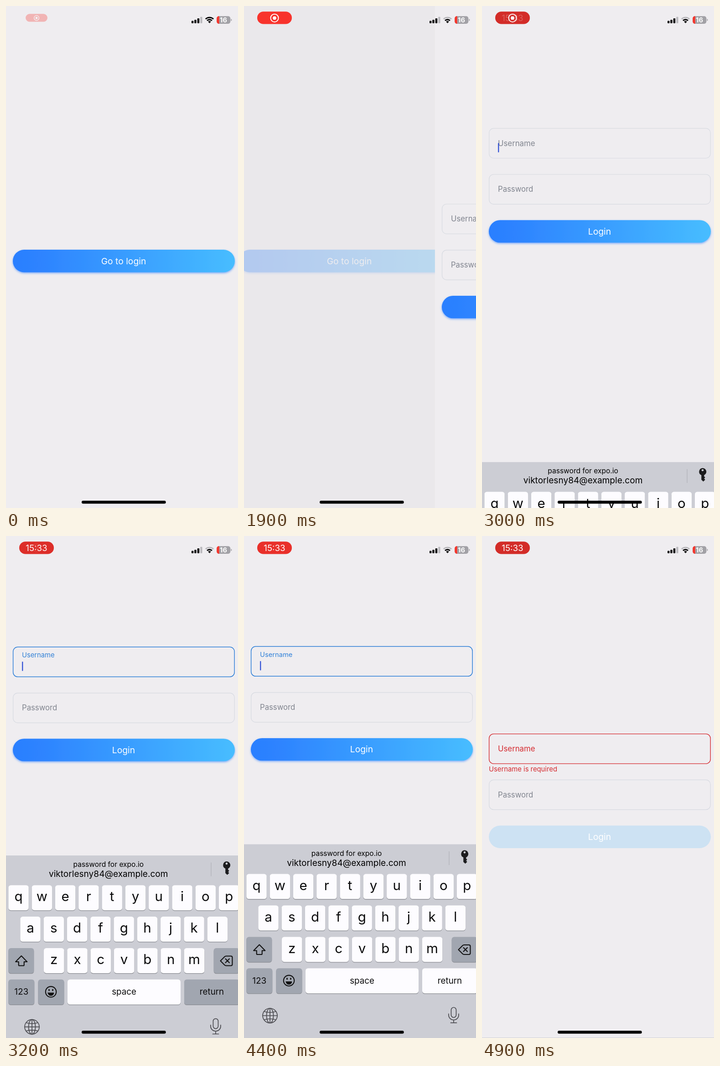
An HTML page that plays this animation: 509x1100 px, repeating every 5000 ms.

```html
<!DOCTYPE html>
<html lang="en">
<head>
<meta charset="utf-8">
<title>Login form</title>
<style>
  html, body { margin: 0; width: 100%; height: 100%; overflow: hidden; background: #efedf0; }
  svg { display: block; width: 100vw; height: 100vh; }
  text { font-family: Inter, Roboto, sans-serif; }
  .mid { text-anchor: middle; }
</style>
</head>
<body>
<svg viewBox="0 0 509 1100">
  <defs>
    <linearGradient id="blue">
      <stop offset="0" stop-color="#2b7fff"/>
      <stop offset=".12" stop-color="#2d83ff"/>
      <stop offset="1" stop-color="#47bdff"/>
    </linearGradient>
    <filter id="glow" x="-5%" y="-20%" width="110%" height="150%">
      <feDropShadow dx="0" dy="2" stdDeviation="1.9" flood-color="#2b7fff" flood-opacity=".6"/>
    </filter>
  </defs>

  <g id="home">
    <rect width="509" height="1100" fill="#efedf0"/>
    <g id="go">
      <rect x="15" y="534" width="487" height="49.5" rx="24.7" fill="url(#blue)" filter="url(#glow)"/>
      <text class="mid" x="258" y="565.5" font-size="19.3" fill="#fff">Go to login</text>
    </g>
  </g>
  <rect id="dim" width="509" height="1100"/>

  <g id="login">
    <rect width="509" height="1100" fill="#efedf0"/>
    <g id="form">
      <rect id="userBox" x="15.6" y="434" width="485.6" height="65.3" rx="10" fill="none"/>
      <text id="userLabel" x="35">Username</text>
      <rect id="caret" x="35" y="466" width="2.4" height="20.5" rx="1" fill="#3b58d6"/>
      <text id="error" x="15" y="516.5" font-size="14.8" fill="#d52b30">Username is required</text>
      <rect x="15.6" y="534.8" width="485.6" height="65.3" rx="10" fill="none" stroke="#d7dae1" stroke-width="1.2"/>
      <text x="35" y="573" font-size="16.7" fill="#81858f">Password</text>
      <rect id="submit" x="15" y="635" width="487" height="49.3" rx="24.6"/>
      <text class="mid" x="258" y="666.3" font-size="19.3" fill="#fff">Login</text>
    </g>
  </g>

  <g id="board">
    <rect y="675.5" width="509" height="430" fill="#cccdd4"/>
    <g id="hint" class="mid">
      <text x="225" y="700.5" font-size="15.55">password for expo.io</text>
      <text x="225" y="722.5" font-size="19.1">viktorlesny84@example.com</text>
    </g>
    <path d="M450 691V721" stroke="#b2b3ba" stroke-width="1.3"/>
    <path fill-rule="evenodd" fill="#1c1c1e" d="M484 688.500a8.200 8.200 0 0 1 3.300 15.700v2.600l2.400 2.400-2.400 2.400 2.400 2.400-4.200 4-4.200-3.800V704.200A8.200 8.200 0 0 1 484 688.500ZM484 691a2.300 2.300 0 1 0 .01 0Z"/>
    <g id="keys"></g>
    <g fill="none" stroke="#111" stroke-width="2.1" stroke-linejoin="round" stroke-linecap="round">
      <path d="M33.700 895.500L46.300 908.500H39.700V915.500Q39.700 917 38.200 917H29.200Q27.700 917 27.700 915.500V908.500H21.100Z"/>
      <path d="M470.500 906.500L479.500 897.500Q481 896 483 896H493.500Q496.500 896 496.500 899V914Q496.500 917 493.500 917H483Q481 917 479.500 915.500ZM481.500 902l8.500 8.500M490 902l-8.500 8.500"/>
      <circle cx="98.500" cy="974.300" r="11.700"/>
      <path d="M92 976.500H105Q104 982.500 98.500 982.500T92 976.500Z" fill="#111" stroke-width="1"/>
      <path d="M94.500 969.500v1.600M102.500 969.500v1.600" stroke-width="2.800"/>
    </g>
    <g fill="none" stroke="#4b4b50" stroke-width="1.7" stroke-linecap="round">
      <circle cx="57" cy="1051" r="16"/>
      <ellipse cx="57" cy="1051" rx="7.600" ry="16"/>
      <path d="M57 1035V1067M41 1051H73M44.500 1042Q57 1046 69.500 1042M44.500 1060Q57 1056 69.500 1060"/>
      <rect x="454.500" y="1033" width="11" height="22" rx="5.500"/>
      <path d="M449 1047v3a11 10.500 0 0 0 22 0v-3M460 1060.500V1066.500M453.500 1066.700H466.500"/>
    </g>
  </g>

  <g id="pill">
    <rect id="pillBox" x="29" y="12.300" width="76" height="27.300" rx="13.600"/>
    <g id="rec">
      <circle cx="67" cy="26.300" r="8.600" fill="none" stroke="#fff" stroke-width="2"/>
      <circle cx="67" cy="26.300" r="3.900" fill="#fff"/>
    </g>
    <text id="clock" class="mid" x="67" y="33" font-size="18.800" fill="#fff">15:33</text>
  </g>

  <rect x="407" y="32.500" width="4.400" height="5.200" rx="1.200"/>
  <rect x="413.300" y="30.300" width="4.400" height="7.400" rx="1.200"/>
  <rect x="419.800" y="27" width="4.400" height="10.700" rx="1.200"/>
  <rect x="426.200" y="23.700" width="4.400" height="14" rx="1.200" fill="#bab9bd"/>
  <g id="wifi" fill="none" stroke="#000" stroke-width="2.900"></g>
  <rect x="462.300" y="22.300" width="30" height="16.600" rx="4.800" fill="#a2a1a6"/>
  <path d="M467.700 22.300V38.900H467.100A4.800 4.800 0 0 1 462.300 34.100V27.100A4.800 4.800 0 0 1 467.100 22.300Z" fill="#f7352c"/>
  <path d="M493.500 28q2 .7 2 2.600t-2 2.600z" fill="#a2a1a6"/>
  <text class="mid" x="477" y="36" font-size="14.800" font-weight="700" fill="#fff">16</text>
  <rect x="166" y="1084" width="184.700" height="6.500" rx="3.200"/>
</svg>

<script>
const $ = id => document.getElementById(id);
const set = (id, attrs) => { for (const k in attrs) $(id).setAttribute(k, attrs[k]); };
const shift = (id, x, y) => set(id, { transform: `translate(${x} ${y})` });
const show = (id, on) => set(id, { visibility: on ? "visible" : "hidden" });
const lerp = (a, b, k) => a + (b - a) * k;
const mix = (a, b, k) => `rgb(${a.map((v, i) => Math.round(lerp(v, b[i], k)))})`;
const clamp = x => Math.min(1, Math.max(0, x));
const ramp = (t, a, b) => { const x = clamp((t - a) / (b - a)); return x * x * (3 - 2 * x); };

// Distance still to go for a critically damped spring, 1 down to 0
const rest = (ms, w) => {
  const x = Math.max(0, ms) / 1000 * w;
  return (1 + x) * Math.exp(-x);
};

const GREY = [129, 133, 143], LINE = [217, 220, 226], BLUE = [47, 128, 216], RED = "#d52b30";
const DARK = "#a1a6b0", WHITE = "#fdfcff";
const LOOP = 5000, STEP = 100;

function key(x, y, w, label, size, fill = WHITE, id = "") {
  const base = y + (size > 25 ? 35.3 : 33.3);
  return `<rect x="${x}" y="${y + 1.3}" width="${w}" height="55" rx="5.5" fill="#8b8d93"/>
    <rect ${id && `id="${id}"`} x="${x}" y="${y}" width="${w}" height="55" rx="5.5" fill="${fill}"/>
    <text class="mid" x="${x + w / 2}" y="${base}" font-size="${size}" fill="#0b0b0c">${label}</text>`;
}

function buildKeys() {
  const rows = [["qwertyuiop", 5.3, 740.6], ["asdfghjkl", 31.3, 809.5], ["zxcvbnm", 83, 878.4]];
  let out = "";
  for (const [chars, x, y] of rows)
    [...chars].forEach((c, i) => out += key(x + i * 51.3, y, 44.4, c, 29.5));
  out += key(5.3, 878.4, 56, "", 19, DARK) + key(455.7, 878.4, 56, "", 19, DARK);
  out += key(5.3, 947.2, 57, "123", 19, DARK) + key(70.5, 947.2, 57, "", 19, DARK);
  out += key(135, 947.2, 248, "space", 18.7) + key(391, 947.2, 121, "return", 18.8, DARK, "enter");
  $("keys").innerHTML = out;
}

function buildWifi() {
  const s = Math.sin(0.75), c = Math.cos(0.75), cx = 446.5, cy = 37.8;
  const arc = r => `M${cx - r * s} ${cy - r * c}A${r} ${r} 0 0 1 ${cx + r * s} ${cy - r * c}`;
  $("wifi").innerHTML = `<path id="outer" d="${arc(12.7)}"/><path d="${arc(8)}"/>
    <path d="${arc(4.8)}L${cx} ${cy}Z" fill="#000" stroke="none"/>`;
}

function drawPill(t) {
  const p = (t + 800) % 1900;
  const pulse = ramp(p, 0, 600) - ramp(p, 1100, 1800);
  const size = 1 - 0.37 * Math.exp(-t / 83) * Math.cos(t / 71);
  const swap = ramp(t, 2890, 3240);
  set("pill", {
    transform: `translate(67 26) scale(${size}) translate(-67 -26)`,
    opacity: clamp(0.3 + t / 280)
  });
  set("pillBox", { fill: mix([211, 44, 40], [248, 51, 44], pulse) });
  set("rec", { opacity: 1 - swap * swap });
  set("clock", { opacity: swap });
}

function drawPush(t) {
  const left = rest(t - 1850, 15.2), on = t > 1850;
  shift("home", -0.3 * 509 * (1 - left), 0);
  set("go", { opacity: 1 - 0.72 * ramp(t, 1700, 1860) });
  set("dim", { opacity: 0.1 * (1 - left) });
  show("login", on);
  shift("login", 509 * left, 0);
}

function drawForm(t) {
  const up = rest(t - 4440, 18.2) - rest(t - 2808, 18.2);
  const float = ramp(t, 3000, 3220) - ramp(t, 4480, 4680);
  const bad = t >= 4500, on = t > 1850;
  shift("form", 0, -192 * up);
  set("userBox", {
    stroke: bad ? RED : mix(LINE, BLUE, float),
    "stroke-width": bad ? 1.4 : lerp(1.2, 1.5, float)
  });
  set("userLabel", {
    y: lerp(472.3, 456.5, float),
    "font-size": lerp(16.8, 14.7, float),
    fill: bad ? RED : mix(GREY, BLUE, float)
  });
  show("caret", t >= 2850 && t < 4500 && (t + 50) % 1000 < 550);
  show("error", bad && on);
  set("submit", { fill: bad ? "#cde2f3" : "url(#blue)", filter: bad ? "none" : "url(#glow)" });
}

function drawBoard(t) {
  const down = rest(t - 2949, 18.2) + 1 - rest(t - 4465, 18.2);
  show("board", t > 2949);
  shift("board", 0, 425 * down);
  shift("hint", t < 4000 ? -4.5 * down : 0, 0);
  set("enter", { fill: t >= 4350 && t < 4500 ? WHITE : DARK });
}

function draw(t) {
  drawPill(t);
  drawPush(t);
  drawForm(t);
  drawBoard(t);
  set("outer", { stroke: t < 1900 ? "#000" : "#b6b5b9" });
}

function tick(now) {
  draw(Math.floor((now % LOOP) / STEP) * STEP);
  requestAnimationFrame(tick);
}

buildKeys();
buildWifi();
draw(0);
requestAnimationFrame(tick);
</script>
</body>
</html>
```
